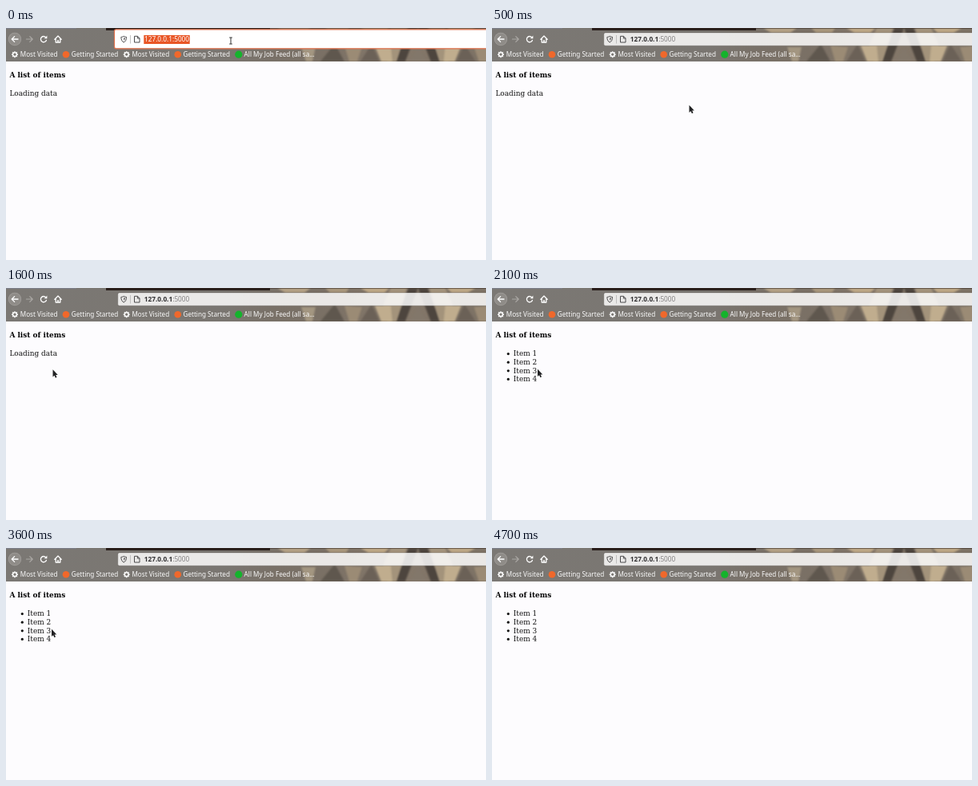
Animation, 600 px wide and 291 px high, one loop 4.8 s. Source, as an HTML page with a canvas:

```html
<!DOCTYPE html>
<html lang="en">
<head>
<meta charset="utf-8">
<title>A list of items</title>
<style>
html, body { margin: 0; width: 100%; height: 100%; overflow: hidden; background: #fdfcfe; }
canvas { display: block; width: 600px; height: 291px; }
</style>
</head>
<body>
<canvas id="stage"></canvas>
<script>
const W = 600, H = 291, BAR = 42, LOOP = 4800, STEP = 100;
const BLUR_AT = 100, ARROW_AT = 300, LIST_AT = 1900, LEAVE_AT = 4700;
const UI = '"Noto Sans", "Open Sans", sans-serif';
const SERIF = '"DejaVu Serif", "Noto Serif", serif';

// Pointer path: time, x, y
const PATH = [
  [300, 268, 40], [500, 246.5, 97], [600, 228, 140], [700, 196, 172],
  [800, 165, 187], [900, 165, 187], [1000, 148, 164], [1100, 130, 136],
  [1300, 92, 112], [1500, 60, 103], [1700, 57, 102], [3600, 57, 102],
  [3700, 45, 91], [3800, 32, 81], [3900, 53, 95], [4300, 53, 95],
  [4400, 78, 110], [4500, 78, 110], [4600, 22, 53], [4800, 22, 53]
];

const canvas = document.getElementById('stage');
const c = canvas.getContext('2d');
const scale = window.devicePixelRatio || 1;
canvas.width = W * scale;
canvas.height = H * scale;

function text(str, x, y, font, color) {
  c.font = font;
  c.fillStyle = color;
  c.fillText(str, x, y);
}

function rect(x, y, w, h, color) {
  c.fillStyle = color;
  c.fillRect(x, y, w, h);
}

function disc(x, y, r, color) {
  c.fillStyle = color;
  c.beginPath();
  c.arc(x, y, r, 0, Math.PI * 2);
  c.fill();
}

function trace(d, color, width, fill) {
  const p = new Path2D(d);
  if (fill) {
    c.fillStyle = fill;
    c.fill(p);
  }
  if (color) {
    c.strokeStyle = color;
    c.lineWidth = width;
    c.stroke(p);
  }
}

function shade(x0, y0, x1, y1, stops) {
  const g = c.createLinearGradient(x0, y0, x1, y1);
  stops.forEach(([at, color]) => g.addColorStop(at, color));
  return g;
}

// Soft stand-in for the photo behind the toolbar, mirrored around x = 515
function backdrop() {
  c.save();
  c.beginPath();
  c.rect(0, 0, W, BAR);
  c.clip();
  rect(0, 0, W, BAR, shade(0, 0, W, 0, [
    [0, '#7b7874'], [0.45, '#7a7671'], [0.55, '#797168'],
    [0.66, '#7a7065'], [0.8, '#85786a'], [1, '#7d7265']
  ]));
  c.filter = `blur(${1.2 * scale}px)`;
  for (const side of [-1, 1]) {
    c.save();
    c.translate(515, 0);
    c.scale(side, 1);
    trace('M0 0H12L28 42H16Z', null, 0, '#4d453e');
    trace('M14 0H34L44 22L38 42H27Z', null, 0, '#a3937b');
    trace('M34 22H54L46 42H32Z', null, 0, '#c0ad8e');
    trace('M58 20L72 42H48Z', null, 0, '#6b6157');
    trace('M70 24L92 22L86 42H76Z', null, 0, '#9b8b75');
    trace('M104 20L122 42H92Z', null, 0, '#5f574e');
    trace('M128 24H146L140 42H132Z', null, 0, '#a39681');
    trace('M36 0H72L62 6H42Z', null, 0, '#bda785');
    trace('M86 0H116L110 6H90Z', null, 0, '#a8967b');
    trace('M134 0H176L166 6H142Z', null, 0, '#b3a084');
    c.restore();
  }
  trace('M515 24L526 42H504Z', null, 0, '#82776a');
  c.filter = 'none';
  rect(125, 0, 205, 3, '#2a1f1c');
  rect(330, 0, 270, 1, 'rgba(42,31,28,.45)');
  rect(0, 0, 88, 1, '#7c7f8a');
  c.restore();
}

function gear(x, y) {
  c.strokeStyle = '#fafafa';
  c.lineWidth = 1.5;
  c.beginPath();
  c.arc(x, y, 2.4, 0, Math.PI * 2);
  for (let i = 0; i < 8; i++) {
    const a = i * Math.PI / 4;
    c.moveTo(x + 2.6 * Math.cos(a), y + 2.6 * Math.sin(a));
    c.lineTo(x + 4 * Math.cos(a), y + 4 * Math.sin(a));
  }
  c.stroke();
}

function navigation() {
  disc(11, 14, 8.2, '#a19e9b');
  disc(11, 14, 7.4, '#8f8c88');
  c.lineCap = c.lineJoin = 'round';
  trace('M15 14H7.4M10.6 10.6L7.2 14L10.6 17.4', '#fff', 1.3);
  trace('M25.4 14H33M29.8 10.6L33.2 14L29.8 17.4', '#aaa7a4', 1.2);
  trace('M49.8 11.8A3.6 3.6 0 1 0 50.4 15.4', '#fff', 1.3);
  trace('M51.4 9.6V13.2H47.8Z', null, 0, '#fff');
  trace('M60.8 14.2L65 10L69.2 14.2M62.2 13.6V18H67.8V13.6', '#fff', 1.3);
  rect(64.2, 15, 1.6, 3, '#fff');
  c.lineCap = 'butt';
  c.lineJoin = 'miter';
}

function bookmarks() {
  const label = (str, x) => text(str, x, 36.3, '8.15px ' + UI, '#fafafa');
  for (const x of [0, 139.7]) {
    gear(11 + x, 33.2);
    label('Most Visited', 17.8 + x);
    disc(75 + x, 33.2, 4.3, '#f0682b');
    label('Getting Started', 81.8 + x);
  }
  disc(290.8, 33.2, 4.6, '#14b32c');
  label('All My Job Feed (all sa…', 297.6);
}

function addressBar(focused, hovered) {
  c.beginPath();
  if (focused) {
    c.roundRect(135.5, 1.8, 480, 24, 2);
    c.fillStyle = '#fff';
    c.strokeStyle = '#e0714c';
    c.lineWidth = 1.2;
  } else {
    c.roundRect(139.8, 5.9, 480, 16.3, 2);
    c.fillStyle = hovered ? '#fdfcfe' : 'rgba(255,255,255,.84)';
    c.strokeStyle = hovered ? 'rgba(50,45,42,.55)' : 'rgba(70,65,62,.35)';
    c.lineWidth = 0.8;
  }
  c.fill();
  c.stroke();
  trace('M147.2 10.3C148.6 11.2 149.5 11.2 150.5 11.3C150.5 14.8 149.5 16.8 147.2 18C144.9 16.8 143.9 14.8 143.9 11.3C144.9 11.2 145.8 11.2 147.2 10.3Z', '#4b4a4c', 1);
  trace('M147.3 12.3V15.8C148.4 15 148.8 14 148.9 12.6Z', null, 0, '#4b4a4c');
  rect(155, 9, 0.8, 10.5, '#b5b3b3');
  trace('M160.5 10.3H164.5L167 12.8V18H160.5ZM164.4 10.3V13H167', '#4b4a4c', 1);

  const font = '8.25px ' + UI, host = '127.0.0.1', port = ':5000';
  if (focused) {
    rect(172.3, 9, 57.4, 11, '#e95626');
    text(host + port, 173, 17.3, font, '#fff');
  } else {
    text(host, 172.8, 17.3, '600 ' + font, '#333234');
    text(port, 172.8 + c.measureText(host).width, 17.3, font, '#858384');
  }
}

function page(loaded) {
  rect(0, BAR, W, H - BAR, '#fdfcfe');
  text('A list of items', 4.4, 62.4, 'bold 8.96px ' + SERIF, '#050505');
  const font = '8.96px ' + SERIF;
  if (!loaded) {
    text('Loading data', 4.4, 85.4, font, '#111');
    return;
  }
  for (let i = 0; i < 4; i++) {
    const y = 85.4 + i * 10.6;
    disc(20.3, y - 2.8, 1.6, '#111');
    text('Item ' + (i + 1), 26.8, y, font, '#111');
  }
}

function position(t) {
  const i = Math.max(1, PATH.findIndex(p => p[0] >= t));
  const [t0, x0, y0] = PATH[i - 1], [t1, x1, y1] = PATH[i];
  const k = (t - t0) / (t1 - t0);
  return [x0 + (x1 - x0) * k, y0 + (y1 - y0) * k];
}

function pointer(t) {
  if (t >= LEAVE_AT) return;
  c.save();
  if (t < ARROW_AT) {
    c.translate(281, 16);
    const beam = 'M-1.8 -4H1.8M0 -4V4M-1.8 4H1.8';
    trace(beam, 'rgba(255,255,255,.7)', 2);
    trace(beam, '#333', 1);
  } else {
    c.translate(...position(t));
    const arrow = 'M0 -0.3V9L2 7.2L3.4 10.2L5 9.5L3.7 6.6H6.3Z';
    trace(arrow, 'rgba(255,255,255,.8)', 1.4);
    trace(arrow, null, 0, '#222224');
  }
  c.restore();
}

function draw(now) {
  const t = Math.floor((now % LOOP) / STEP) * STEP;
  c.setTransform(scale, 0, 0, scale, 0, 0);
  backdrop();
  navigation();
  bookmarks();
  addressBar(t < BLUR_AT, t < ARROW_AT);
  page(t >= LIST_AT);
  pointer(t);
}

const start = performance.now();
function tick() {
  draw(performance.now() - start);
  requestAnimationFrame(tick);
}
tick();
</script>
</body>
</html>
```
